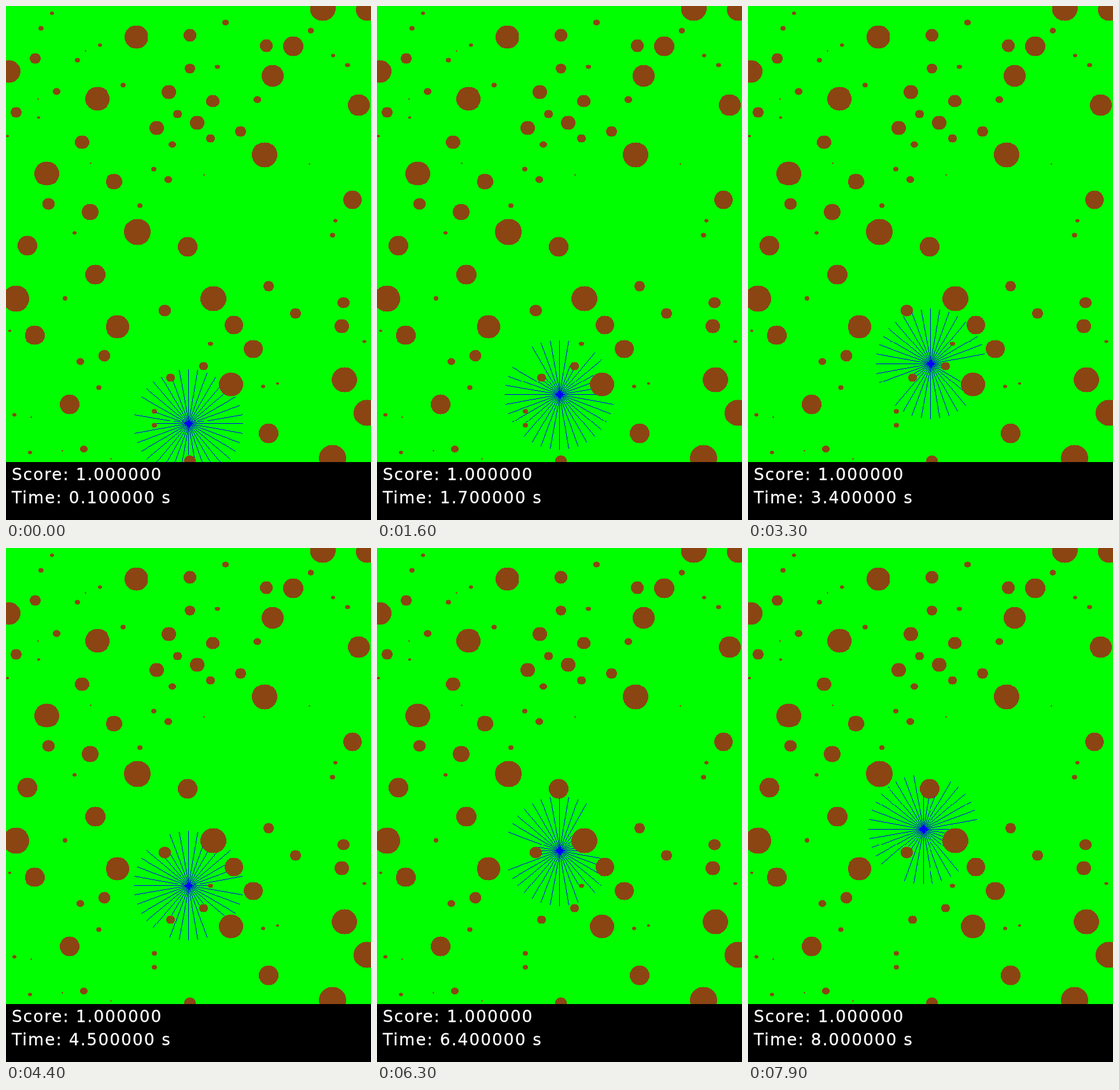
An HTML page with a canvas that plays this animation: 631x887 px, repeating every 8000 ms.

```html
<!DOCTYPE html>
<html lang="en">
<head>
<meta charset="utf-8">
<title>Range sensor run</title>
<style>
  html, body { margin: 0; width: 100%; height: 100%; overflow: hidden; background: #000; }
  canvas { position: absolute; left: 0; top: 0; }
  .line {
    position: absolute; left: 10px; white-space: pre; color: #fff;
    font: 28px/32px "DejaVu Sans", sans-serif; letter-spacing: 2px;
    -webkit-text-stroke: 0.3px #fff;
  }
  #score { top: 793px; }
  #time { top: 833px; }
</style>
</head>
<body>
<canvas id="view" width="631" height="887"></canvas>
<div class="line" id="score">Score: 1.000000</div>
<div class="line" id="time">Time: 0.100000 s</div>
<script>
// The world is drawn at W x H and shown slightly reduced, without smoothing.
const W = 640, H = 900, FIELD = 799;
const METRE = FIELD / 25;
const STEP = METRE / 10;
const RANGE = 95.6;
const RAYS = 36;
const TICK = 100, TICKS = 80;
const STRAIGHT = 63;           // ticks spent driving straight up
const DETOUR = "UULUULUULUULUUUU";

const view = document.getElementById("view").getContext("2d");
const clock = document.getElementById("time");
view.imageSmoothingEnabled = false;

function layer() {
  const c = document.createElement("canvas");
  c.width = W;
  c.height = H;
  return c.getContext("2d");
}
const stage = layer(), field = layer();

const rocks = [];
function add(r, ...spots) {
  for (const [x, y] of spots) rocks.push({ x, y, r });
}

// Landmarks: the big rocks and those beside the route
add(23, [230, 395], [17, 512], [572, 791], [633, 712]);
add(22, [555, 3], [453, 260], [363, 512], [593, 654]);
add(21, [160, 162], [71, 293], [394, 662]);
add(20, [228, 54], [4, 114], [195, 561]);
add(19, [633, 6], [467, 122], [618, 173]);
add(17, [318, 421], [37, 419], [156, 470], [50, 576], [111, 697], [460, 748], [503, 70]);
add(16, [399, 558], [433, 600], [607, 339]);
add(10, [278, 533], [322, 796]);
add(7, [346, 630], [288, 650]);
add(4, [358, 591], [260, 709], [260, 734]);

// Small rocks, scattered with a clear gap and off the route
function random(seed) {
  return () => (seed = seed * 16807 % 2147483647) / 2147483647;
}
function scatter(count, gap) {
  const rnd = random(2024);
  for (let tries = 0; count > 0 && tries < 5000; tries++) {
    const r = 1 + Math.floor(14 * rnd() ** 1.2);
    const x = Math.floor(rnd() * W), y = Math.floor(rnd() * FIELD);
    const onRoute = Math.abs(x - 320) < 105 + r && y > 390;
    const close = rocks.some(o => Math.hypot(o.x - x, o.y - y) < o.r + r + gap);
    if (onRoute || close) continue;
    add(r, [x, y]);
    count--;
  }
}
scatter(60, 16);

// Hard-edged disc
function disc(c, x, y, r) {
  for (let row = -r; row <= r; row++) {
    const half = Math.round(Math.sqrt(r * r - row * row));
    c.fillRect(x - half, y + row, 2 * half + 1, 1);
  }
}

// Hard-edged one pixel line
function line(c, x0, y0, x1, y1) {
  const n = Math.max(Math.abs(x1 - x0), Math.abs(y1 - y0), 1);
  for (let i = 0; i <= n; i++) {
    c.fillRect(Math.round(x0 + (x1 - x0) * i / n), Math.round(y0 + (y1 - y0) * i / n), 1, 1);
  }
}

field.fillStyle = "#00ff00";
field.fillRect(0, 0, W, FIELD);
field.fillStyle = "#8b4513";
for (const { x, y, r } of rocks) disc(field, x, y, r);

function position(tick) {
  const moves = DETOUR.slice(0, Math.max(0, tick - STRAIGHT));
  const left = moves.split("L").length - 1;
  return { x: W / 2 - left * STEP, y: 23 * METRE - (tick + 1 - left) * STEP };
}

// Distance to the nearest rock along a direction
function cast(p, ux, uy) {
  let best = RANGE;
  for (const rock of rocks) {
    const dx = rock.x - p.x, dy = rock.y - p.y, r = rock.r + 0.6;
    const along = dx * ux + dy * uy, off = dx * uy - dy * ux;
    if (along <= 0 || Math.abs(off) >= r) continue;
    best = Math.min(best, along - Math.sqrt(r * r - off * off));
  }
  return Math.max(0, best);
}

function draw(tick) {
  const p = position(tick);
  const cx = Math.floor(p.x), cy = Math.floor(p.y);
  stage.drawImage(field.canvas, 0, 0);
  stage.fillStyle = "#0000ff";
  for (let i = 0; i < RAYS; i++) {
    const a = i * 2 * Math.PI / RAYS;
    const ux = Math.cos(a), uy = Math.sin(a), d = cast(p, ux, uy);
    // the small bias keeps axis-aligned rays on their own row or column
    line(stage, cx, cy, Math.floor(p.x + ux * d + 1e-6), Math.floor(p.y + uy * d + 1e-6));
  }
  disc(stage, cx, cy, 3);
  stage.fillStyle = "#000";
  stage.fillRect(0, FIELD, W, H - FIELD);
  view.drawImage(stage.canvas, 0, 0, 631, 887);
  clock.textContent = `Time: ${((tick + 1) / 10).toFixed(6)} s`;
}

let shown = -1;
const start = performance.now();
function frame(now) {
  const t = Math.max(0, now - start) % (TICK * TICKS);
  const tick = Math.floor(t / TICK);
  if (tick !== shown) draw(shown = tick);
  requestAnimationFrame(frame);
}
frame(start);
</script>
</body>
</html>
```
